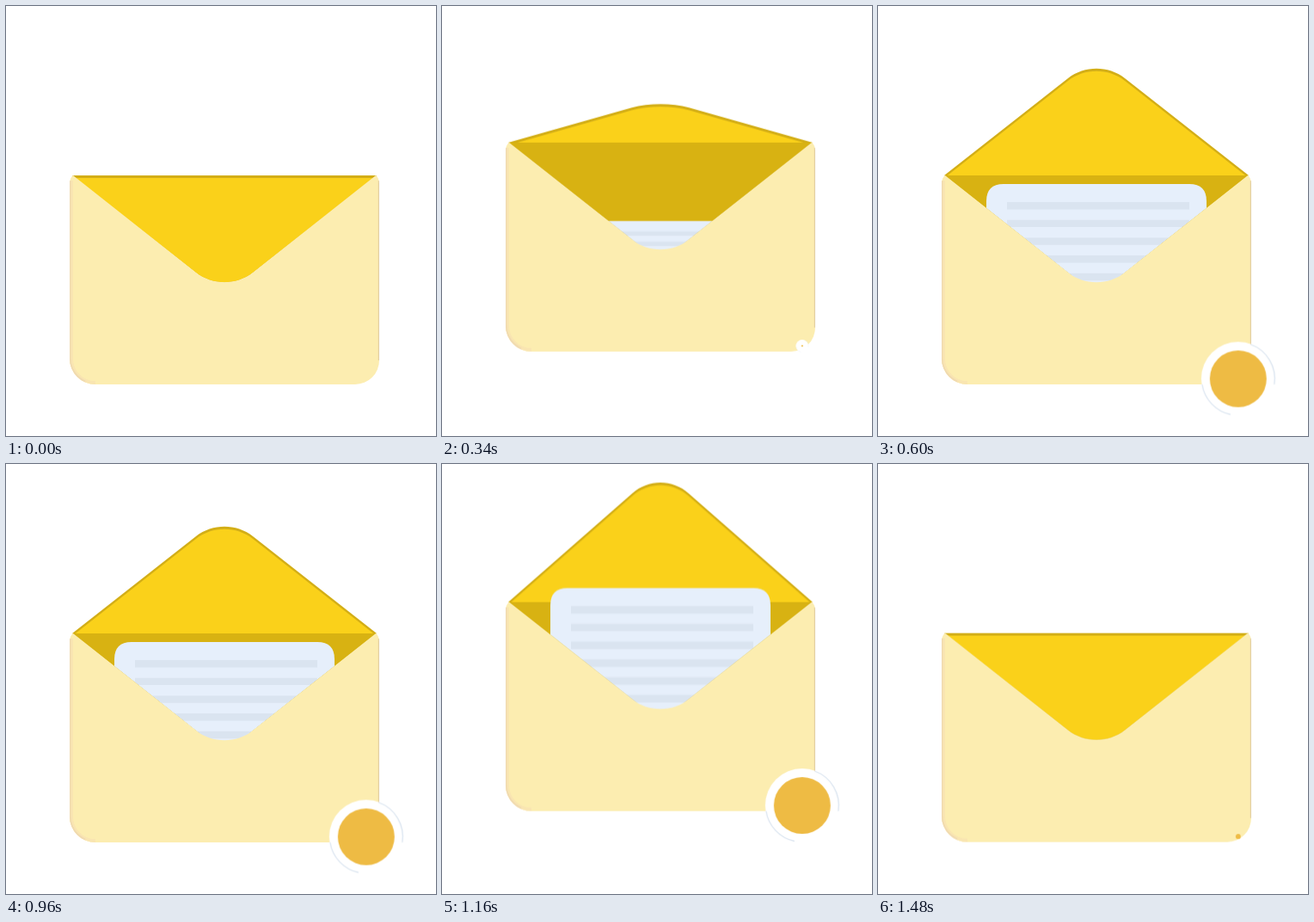
An HTML page for the animation above (1500 ms loop, 500 by 500 pixels).

```html
<!DOCTYPE html>
<html lang="en">
<head>
<meta charset="utf-8">
<title>Envelope</title>
<style>
  html, body { margin: 0; width: 100%; height: 100%; overflow: hidden; background: #fff; }
  svg { display: block; width: 100%; height: 100%; }

  .jump, .flap, .slide, .sheet, .ring, .dot {
    animation: 1500ms cubic-bezier(.37, 0, .63, 1) infinite;
    transform-origin: 0 0;
  }
  .jump  { animation-name: jump; }
  .flap  { animation-name: flap; }
  .slide { animation-name: slide; }
  .sheet { animation-name: sheet; }
  .ring  { animation-name: ring; }
  .dot   { animation-name: dot; }

  @keyframes jump {
    0%, 40%, 66.67%, 100% { transform: translateY(0); }
    20%, 80% { transform: translateY(-40px); }
  }
  /* negative scale folds the flap down over the pocket */
  @keyframes flap {
    0%, 10% { transform: scaleY(-1); }
    30.67%, 64% { transform: scaleY(1); }
    78.67%, 86% { transform: scaleY(1.12); }
    98.67%, 100% { transform: scaleY(-1); }
  }
  @keyframes slide {
    0%, 31.67% { transform: translateY(0); }
    40%, 66.67% { transform: translateY(32px); }
    80%, 100% { transform: translateY(3px); }
  }
  @keyframes sheet {
    0%, 11.8% { transform: scaleY(0); }
    31.67%, 84.67% { transform: scaleY(1); }
    98.67%, 100% { transform: scaleY(0); }
  }
  @keyframes ring {
    0%, 18% { transform: scale(0); }
    35.4%, 87% { transform: scale(1); }
    98.3%, 100% { transform: scale(0); }
  }
  @keyframes dot {
    0%, 20.9% { transform: scale(0); }
    36.9%, 86% { transform: scale(1); }
    100% { transform: scale(.07); }
  }
</style>
</head>
<body>
<svg viewBox="0 0 500 500">
  <defs>
    <path id="tri" d="M77 0L221 -113C240 -128 268 -128 287 -113L431 0Z"/>
    <path id="pocket" d="M78 0L221 113C240 128 268 128 287 113L430 0Q434 3 434 10V215A28 28 0 0 1 406 243H104A30 30 0 0 1 74 213V10Q74 3 78 0Z"/>
    <clipPath id="flapClip">
      <path class="flap" d="M77 0L221 -113C240 -128 268 -128 287 -113L431 0Z"/>
    </clipPath>
    <clipPath id="pocketClip"><use href="#pocket"/></clipPath>
  </defs>

  <!-- y = 0 is the fold line -->
  <g transform="translate(0 197)">
    <g class="jump">
      <use href="#tri" transform="scale(1 -1)" fill="#d8b212"/>

      <g clip-path="url(#flapClip)">
        <rect x="70" y="-150" width="370" height="300" fill="#d3ae17"/>
        <g transform="translate(0 3)">
          <use href="#tri" class="flap" fill="#fad11a"/>
        </g>
      </g>

      <g clip-path="url(#pocketClip2)">
        <g class="slide">
          <g transform="translate(0 247)">
            <g class="sheet">
              <path d="M126 -60V-249Q126 -269 146 -269H362Q382 -269 382 -249V-60Z" fill="#e6effb"/>
              <path d="M256 -248v133" stroke="#dae4f0" stroke-width="212" stroke-dasharray="8.4 12.3"/>
            </g>
          </g>
        </g>
      </g>
      <clipPath id="pocketClip2"><path d="M74 -150H434V0H430L254 139L78 0H74Z"/></clipPath>

      <use href="#pocket" fill="#fcedb0"/>
      <g clip-path="url(#pocketClip)" fill="none">
        <path d="M74 6V213A30 30 0 0 0 104 243" stroke="#f9e5b1" stroke-width="8"/>
        <path d="M74 6V213A30 30 0 0 0 92 240" stroke="#f0dab0" stroke-width="3"/>
        <path d="M434 6V215" stroke="#e3d0a4" stroke-width="2.5"/>
      </g>

      <g transform="translate(418.8 236.5)">
        <g class="ring">
          <circle r="43" fill="#fff"/>
          <path d="M14.5 -40A42.5 42.5 0 0 1 42 6.5M-9 41.5A42.5 42.5 0 0 1 -42 6.5" fill="none" stroke="#dbe5f0" stroke-width="1.3"/>
        </g>
        <circle class="dot" r="33" fill="#eebb44"/>
      </g>
    </g>
  </g>
</svg>
</body>
</html>
```
